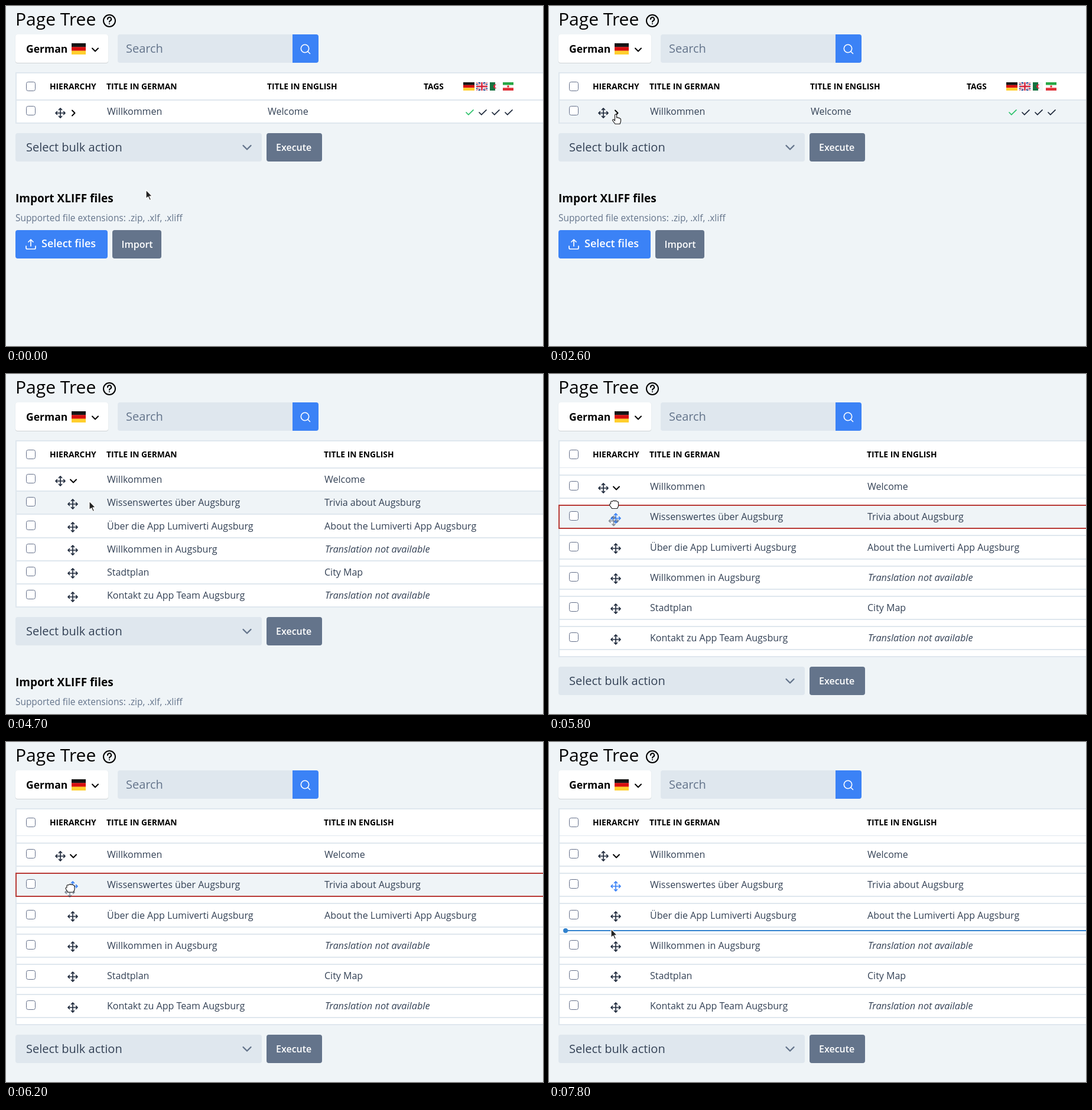
Recreate the animation shown at these times as an HTML page. Size 909 by 575 pixels, loop 8000 ms.

```html
<!DOCTYPE html>
<html lang="en">
<head>
<meta charset="utf-8">
<title>Page Tree</title>
<style>
  html, body { margin: 0; width: 100%; height: 100%; overflow: hidden; background: #eff4f7; }
  svg { display: block; font-family: "Open Sans", sans-serif; }
</style>
</head>
<body>
<svg id="stage" width="909" height="575" viewBox="0 0 909 575"></svg>
<script>
const LOOP = 8000, STEP = 100;
const EXPAND = 3300, DRAG = 5800, RELEASE = 7800;
const PAGE = '#eff4f7', LINE = '#dfe7ee', SLATE = '#64748b', BLUE = '#3b82f6';
const INK = '#1e293b', BODY = '#334155', TARGET = '#3182ce', DENIED = '#b83a36';

const pages = [
  ['Willkommen', 'Welcome'],
  ['Wissenswertes über Augsburg', 'Trivia about Augsburg'],
  ['Über die App Lumiverti Augsburg', 'About the Lumiverti App Augsburg'],
  ['Willkommen in Augsburg'],
  ['Stadtplan', 'City Map'],
  ['Kontakt zu App Team Augsburg']
];

// Pointer position: time, x, y
const pointerKeys = [
  [0, 237, 311], [600, 237, 311], [900, 219, 229], [1000, 219, 229],
  [1400, 177, 224], [1700, 177, 224], [1800, 175, 225], [2000, 175, 225],
  [2400, 120, 190], [2500, 120, 190], [2600, 113, 183], [3700, 113, 183],
  [4200, 140, 203], [4600, 166, 216], [4700, 141, 215], [5100, 111, 219],
  [5700, 111, 219], [5900, 110, 222], [6200, 109, 247], [6600, 108, 298],
  [6800, 108, 311], [7000, 108, 311], [7500, 106, 318], [7700, 106, 318],
  [7800, 105, 316], [8000, 105, 316]
];

function pointerAt(t) {
  const i = pointerKeys.findIndex(k => k[0] > t);
  const [t0, x0, y0] = pointerKeys[i - 1], [t1, x1, y1] = pointerKeys[i];
  const p = (t - t0) / (t1 - t0);
  return { x: x0 + (x1 - x0) * p, y: y0 + (y1 - y0) * p };
}

const rect = (x, y, w, h, fill, r = 0, extra = '') =>
  `<rect x="${x}" y="${y}" width="${w}" height="${h}" rx="${r}" fill="${fill}" ${extra}/>`;
const text = (x, y, str, size = 16, weight = 400, fill = BODY, extra = '') =>
  `<text x="${x}" y="${y}" font-size="${size}" font-weight="${weight}" fill="${fill}" ${extra}>${str}</text>`;
const stroke = (x, y, d, color = INK, width = 2, extra = '') =>
  `<path transform="translate(${x} ${y})" d="${d}" fill="none" stroke="${color}" stroke-width="${width}" stroke-linecap="round" stroke-linejoin="round" ${extra}/>`;

const CHEVRON_DOWN = 'M-5-2.5 0 2.5 5-2.5', CHEVRON_RIGHT = 'M-2-4.5 2.5 0-2 4.5';
const moveIcon = (x, y, color = INK, extra = '') => stroke(x, y,
  'M-8 0H8M0-8V8M-2.5-5.5 0-8 2.5-5.5M-2.5 5.5 0 8 2.5 5.5M-5.5-2.5-8 0-5.5 2.5M5.5-2.5 8 0 5.5 2.5',
  color, 1.7, extra);
const checkbox = y => rect(34.5, y - 7.5, 15, 15, '#fff', 3, 'stroke="#64708a"');

function stripes(x, y, w, h, colors) {
  const bands = colors.map((c, i) => rect(0, i * h / 3, w, h / 3 + .2, c)).join('');
  return `<svg x="${x}" y="${y}" width="${w}" height="${h}">${bands}</svg>`;
}
const germanFlag = (x, y, w, h) => stripes(x, y, w, h, ['#151515', '#d80f0f', '#ffcf2e']);
const britishFlag = (x, y) => `<svg x="${x}" y="${y}" width="19" height="14">${rect(0, 0, 19, 14, '#17408b')}
  <path d="M0 0 19 14M19 0 0 14" stroke="#fff" stroke-width="3"/><path d="M0 0 19 14M19 0 0 14" stroke="#d2243c"/>
  <path d="M9.5 0V14M0 7H19" stroke="#fff" stroke-width="5"/><path d="M9.5 0V14M0 7H19" stroke="#d2243c" stroke-width="2.6"/></svg>`;
const algerianFlag = (x, y) => rect(x, y, 9, 14, '#16713f') + rect(x + 9, y, 8, 14, '#f5f7f8') +
  `<path d="M${x + 11.5} ${y + 4.3}a3.4 3.4 0 1 0 0 5.4a2.7 2.7 0 1 1 0-5.4" fill="#d5233b"/>`;
const iranianFlag = (x, y) => stripes(x, y, 18, 14, ['#28a745', '#fff', '#df2f36']) +
  `<circle cx="${x + 9}" cy="${y + 7}" r="1.8" fill="#df2f36"/>`;

function toolbar() {
  return text(16, 33, 'Page Tree', 30, 400, '#000') +
    '<circle cx="175" cy="25" r="10" fill="none" stroke="#000" stroke-width="2"/>' +
    stroke(175, 25, 'M-3-2.6A3.1 3.1 0 1 1 1.4 0Q0 .7 0 2M0 5V5.1', '#000') +
    rect(16, 49, 157, 48, '#00000018', 4) + rect(15.5, 48, 158, 49, '#0000000c', 4) +
    rect(16, 48, 157, 48, '#fff', 4) +
    text(34, 79, 'German', 17.5, 700, '#000') + germanFlag(111, 63, 24, 19) +
    stroke(151, 74, CHEVRON_DOWN, '#000') +
    rect(189, 48, 300, 48, LINE, 4) + text(203, 79, 'Search', 20, 400, SLATE) +
    rect(485, 48, 44, 48, BLUE, 4) + rect(485, 48, 8, 48, BLUE) +
    stroke(506, 72, 'M6.7 0A6.7 6.7 0 1 1-6.7 0A6.7 6.7 0 1 1 6.7 0M5 5 8.5 8.5', '#fff', 1.6);
}

function tableHead(expanded, englishX) {
  const label = (x, str) => text(x, 140.5, str, 13.8, 700, '#000');
  let out = checkbox(136) + label(74, 'HIERARCHY') + label(170, 'TITLE IN GERMAN') +
    label(englishX - 1, 'TITLE IN ENGLISH');
  if (!expanded) {
    out += label(707, 'TAGS') + germanFlag(774, 129, 19, 14) + britishFlag(796, 129) +
      algerianFlag(819, 129) + iranianFlag(841, 129);
  }
  return out;
}

function row(i, top, hovered, expanded, dragging, englishX) {
  const [german, english] = pages[i];
  const y = Math.round(top), bottom = Math.round(top + 39.2);
  const textY = Math.floor(top + .6), iconY = Math.floor(top) + 22;
  let out = rect(18, y, 891, bottom - y, hovered ? PAGE : '#fff') +
    rect(16, y - 1, 893, 2, LINE) + rect(16, bottom - 1, 893, 2, LINE) +
    checkbox(textY + 18) + text(171, textY + 25, german);
  out += english ? text(englishX, textY + 25, english)
    : text(englishX + 1, textY + 25, 'Translation not available', 16.3, 400, BODY, 'font-style="italic"');
  if (i) return out + moveIcon(113, iconY, dragging && i === 1 ? BLUE : INK);
  out += moveIcon(92, iconY) + stroke(114, iconY, expanded ? CHEVRON_DOWN : CHEVRON_RIGHT, '#000');
  if (!expanded) {
    [785, 807, 829, 851].forEach((x, n) =>
      out += stroke(x, y + 21, 'M-6 0-2.2 3.8 6-4.2', n ? INK : '#2dc26b', 1.7));
  }
  return out;
}

function footer(y) {
  return rect(16, y, 417, 48, LINE, 4) + text(34, y + 31, 'Select bulk action', 20) +
    stroke(408, y + 24, 'M-6.5-3 0 3.5 6.5-3', SLATE, 2.3) +
    rect(441, y, 94, 48, SLATE, 4) + text(457, y + 30, 'Execute', 16, 600, '#fff');
}

function importForm(y) {
  return text(16, y + 33, 'Import XLIFF files', 19, 700, '#000') +
    text(16, y + 65, 'Supported file extensions: .zip, .xlf, .xliff', 15.4, 400, SLATE) +
    rect(16, y + 80, 156, 48, BLUE, 4) +
    stroke(42, y + 104, 'M-8 3V6Q-8 8-6 8H6Q8 8 8 6V3M0 3V-8M-4-4 0-8 4-4', '#fff', 1.7) +
    text(60, y + 109, 'Select files', 18, 600, '#fff') +
    rect(180, y + 80, 83, 48, SLATE, 4) + text(195.5, y + 110, 'Import', 16, 600, '#fff');
}

function cursor(kind, x, y) {
  const shape = (d, fill, outline) =>
    `<path transform="translate(${x} ${y})" d="${d}" fill="${fill}" stroke="${outline}" stroke-width="1.2" stroke-linejoin="round"/>`;
  if (kind === 'arrow') return shape('M0 0V15L3.6 11.8 6.2 17.5 8.6 16.4 6 10.9H10.6Z', '#222', '#fff');
  if (kind === 'pointer') return shape('M-1.5 8V1Q0-1 1.5 1V6Q3 4.5 4.3 6.5Q6 5.5 6.7 7.2Q8.5 7 8.5 9V12L7 16.5H-1L-5.5 10.5Q-5.5 8.5-3.5 9L-1.5 11Z', '#fff', '#222');
  if (kind === 'grab') return shape('M-4 8-8 1Q-7-1-5 1L-5-5Q-4-7-2.5-5L-2-7Q0-9 1-7L1.5-5Q3.5-7 4.5-4V-2Q7-4 7.5-1V3L5 8Z', '#fff', '#222');
  return shape('M-4 7-7.5 2Q-9-1-6-1V-4Q-5-6-3-5Q-1-7.5 1-5.5Q3-7 4.5-5Q7-5 7-2V3L5 7Z', '#fff', '#222');
}

function dropMarker(y, rowTop) {
  const outline = (i, color) => rect(17, Math.round(rowTop(i)), 900,
    Math.round(rowTop(i) + 39.2) - Math.round(rowTop(i)), 'none', 0, `stroke="${color}" stroke-width="2"`);
  const i = Math.floor((y - rowTop(0)) / 51.2);
  if (i < 1) return '';
  if (y < rowTop(i) + 41.5) return outline(i, i === 1 ? DENIED : TARGET);
  const gap = Math.round(rowTop(i) + 45.2);
  return rect(28, gap - 1, 881, 2, TARGET) + `<circle cx="28" cy="${gap}" r="4" fill="${TARGET}"/>`;
}

function scene(t) {
  const { x, y } = pointerAt(t);
  const expanded = t >= EXPAND, dragging = t >= DRAG, held = dragging && t < RELEASE;
  const count = expanded ? pages.length : 1, gap = dragging ? 12 : 0;
  const rowTop = i => 159 + gap + i * (39.2 + gap);
  const end = Math.round(rowTop(count));
  const englishX = expanded ? 539 : 443;
  const hovered = held ? 1 : dragging ? -1 : Math.floor((y - 159) / 39.2);

  let out = rect(0, 0, 909, 575, PAGE) + toolbar() +
    rect(16, 112, 893, end - 111, LINE) + rect(18, 114, 891, end - 115, '#fff') +
    tableHead(expanded, englishX);
  if (dragging) out += rect(16, 158, 893, 1, LINE);
  for (let i = 0; i < count; i++) out += row(i, rowTop(i), i === hovered, expanded, dragging, englishX);
  out += footer(end + 17) + importForm(end + 101);

  if (dragging) out += dropMarker(y + 2, rowTop);
  if (held) out += moveIcon(x - 1, y + (t < 6000 ? 28 : 7), INK, 'opacity=".5"');
  if (t >= 3100 && t < EXPAND) {
    out += rect(112, 208, 167, 42, '#2b2b2b', 5) + text(121, 234, 'Expand all subpages', 15, 400, '#fff');
  }

  const over = (cx, cy) => Math.abs(x - cx) < 10 && Math.abs(y - cy) < 11;
  const kind = held ? 'grabbing' : dragging ? 'arrow' : over(114, 182) ? 'pointer'
    : expanded && over(113, 219) ? 'grab' : 'arrow';
  out += cursor(kind, x, y);
  if (held && y > 262) {
    out += `<g transform="translate(${x + 7} ${y + 6}) scale(.5)">` +
      moveIcon(0, 0, '#fff', 'style="stroke-width:5"') + moveIcon(0, 0, '#111') + '</g>';
  }
  return out;
}

const stage = document.getElementById('stage');
let shown = -1;
function tick() {
  const t = Math.floor(performance.now() % LOOP / STEP) * STEP;
  if (t !== shown) stage.innerHTML = scene(shown = t);
  requestAnimationFrame(tick);
}
tick();
</script>
</body>
</html>
```
